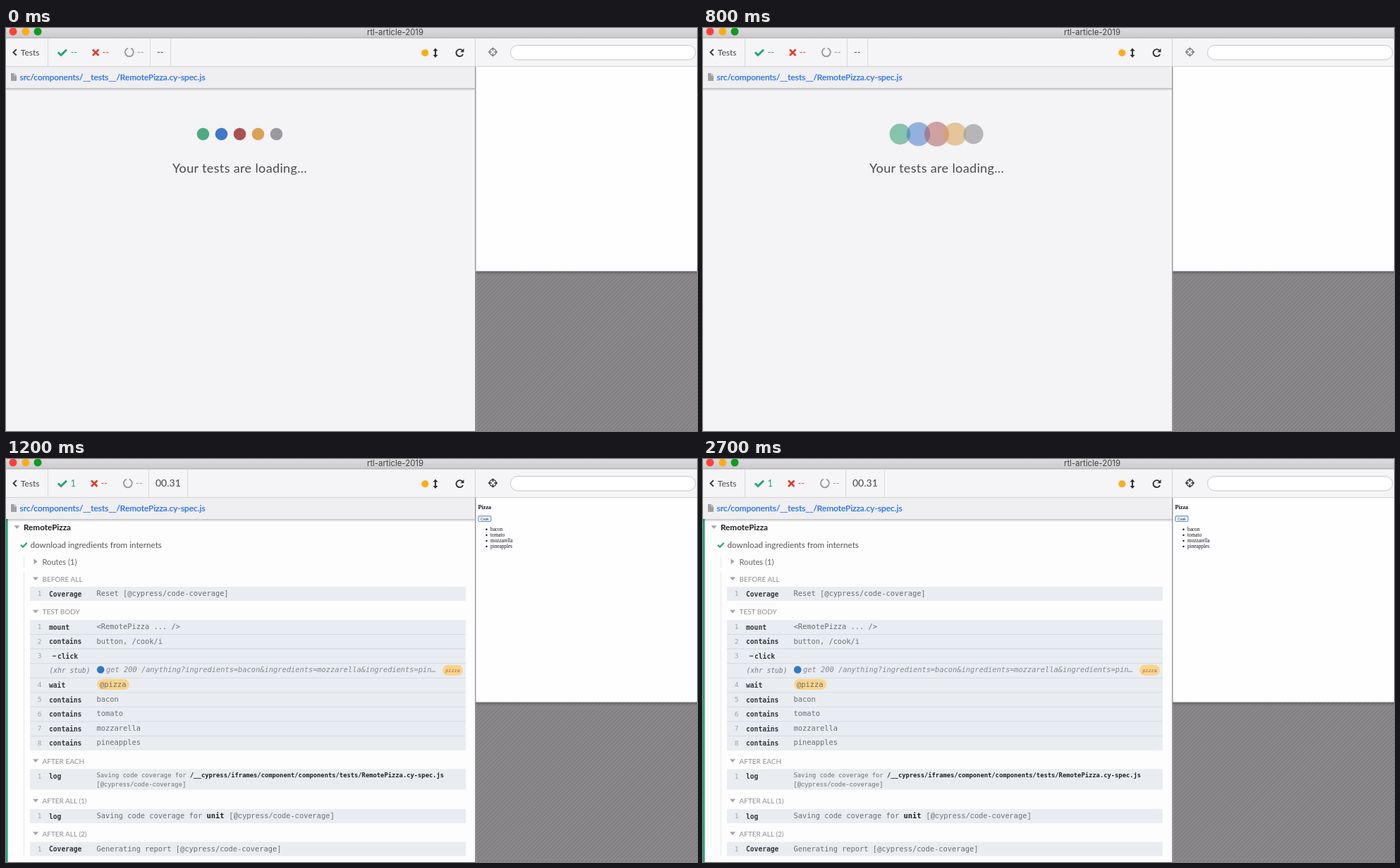
Recreate the animation shown at these times as an HTML page. Size 980 by 571 pixels, loop 2.8 s.

```html
<!DOCTYPE html>
<html lang="en">
<head>
<meta charset="utf-8">
<title>Test runner</title>
<style>
  html, body { margin: 0; width: 100%; height: 100%; overflow: hidden; background: #f4f3f5; }
  svg { display: block; width: 980px; height: 571px; }
  text { font-family: Lato, "Open Sans", sans-serif; white-space: pre; }
  .mono { font: 10.36px "DejaVu Sans Mono", monospace; fill: #6a6d73; }
  .cmd { font-size: 9.65px; font-weight: bold; fill: #33363b; }
  .num { font-size: 9.5px; fill: #9da0a8; text-anchor: end; }
  .it { font-style: italic; fill: #868a92; }
  .stub { font-size: 9.65px; fill: #777b83; }
  .live { font-weight: normal; fill: #3b82d2; }
  .small { font-size: 8.8px; }
  .tag { font-family: "Liberation Mono", monospace; }
  .strong { font-weight: bold; fill: #1d1f22; }
  .alias { font-size: 6.8px; fill: #84724f; text-anchor: middle; }
  .head { font-size: 10px; fill: #8d8c91; }
  .page text { font-family: "Liberation Serif", serif; font-size: 7.25px; fill: #111; }
  .line { fill: none; }
  .guide { fill: none; stroke: #cfced2; stroke-dasharray: 1 1; }
  .stat { font-size: 13px; }
  .time { font-size: 14px; fill: #47474a; }
</style>
</head>
<body>
<svg viewBox="0 0 980 571">
  <defs>
    <linearGradient id="bar" x2="0" y2="1">
      <stop stop-color="#dddbdd"/><stop offset="1" stop-color="#cbc9cb"/>
    </linearGradient>
    <linearGradient id="shade" x2="0" y2="1">
      <stop stop-color="#000" stop-opacity=".24"/><stop offset="1" stop-color="#000" stop-opacity="0"/>
    </linearGradient>
    <pattern id="hatch" width="4" height="4" patternUnits="userSpaceOnUse" patternTransform="rotate(45)">
      <rect width="1.7" height="4" fill="#7e7c7e"/>
    </pattern>
    <path id="fold" d="M-4-2.3H4L0 2.5Z" fill="#a3a2a6"/>
    <g id="reload" fill="none" stroke="#303033" stroke-width="1.9">
      <path d="M3.6-3.4A5 5 0 1 0 4.6 2.2"/><path d="M6-6V-.8H.8Z" fill="#303033" stroke="none"/>
    </g>
  </defs>

  <rect width="980" height="571" fill="#f4f3f5"/>

  <!-- test list -->
  <g data-in="run">
    <rect y="85" width="665" height="233" fill="#fefdfe"/>
    <rect y="317.5" width="665" height="1.5" fill="#c3c2c4"/>
    <rect y="319" width="665" height="2" fill="#e7e6e8"/>
  </g>
  <g data-in="done">
    <rect y="85" width="665" height="486" fill="#fefdfe"/>
    <rect y="85" width="2.6" height="486" fill="#1fa678"/>
  </g>
  <g data-in="run done" id="log">
    <use href="#fold" x="15.5" y="96.5"/>
    <text x="25" y="100.5" font-size="11.7" font-weight="bold" fill="#1c1c1f">RemotePizza</text>
    <text x="34.5" y="125.5" font-size="11.7" fill="#55555a">download ingredients from internets</text>
    <path d="M39.5 141.3V149.3L44.5 145.3Z" fill="#a3a2a6"/>
    <text x="51.5" y="149.7" font-size="11.1" fill="#626267">Routes (1)</text>
    <path d="M25.5 139V154" class="guide"/>
  </g>
  <g data-in="run">
    <g id="sync" fill="none" stroke="#4a4a4e" stroke-width="1.5">
      <path d="M21 120.5A4.3 4.3 0 0 1 28.5 118.8M29.3 122.5A4.3 4.3 0 0 1 21.8 124.2"/>
      <path d="M30.5 116.5V121H26ZM19.8 126.5V122H24.3Z" fill="#4a4a4e" stroke="none"/>
    </g>
    <path d="M25.5 160V309" class="guide"/>
  </g>
  <g data-in="done">
    <path d="M21 121.8L24 124.7L29.7 118.8" class="line" stroke="#1fa678" stroke-width="2.2"/>
    <path d="M25.5 160V562" class="guide"/>
  </g>
  <g data-in="run" id="running"></g>
  <g data-in="done" id="finished"></g>

  <!-- loader -->
  <g data-in="load">
    <g id="dots"></g>
    <text x="331.5" y="205" font-size="18" letter-spacing=".36" text-anchor="middle" fill="#4b4b4f">Your tests are loading...</text>
  </g>

  <!-- file bar -->
  <rect y="85" width="665" height="4" fill="url(#shade)"/>
  <rect y="55" width="665" height="30" fill="#efeef1"/>
  <path d="M7 64H12L15 67V75H7Z" fill="#a09fa3"/>
  <path d="M12 64V67H15" class="line" stroke="#efeef1" stroke-width=".8"/>
  <text x="19.5" y="73.7" font-size="11.95" fill="#2470e6" stroke="#2470e6" stroke-width=".25">src/components/__tests__/RemotePizza.cy-spec.js</text>

  <!-- preview -->
  <rect x="666" y="55" width="314" height="290" fill="#fefdff"/>
  <g class="page" data-in="run done" id="page">
    <text x="669.5" y="70.5" style="font-size:8.2px;font-weight:bold">Pizza</text>
    <rect x="669.9" y="80.9" width="18" height="7.6" rx="1.5" fill="#fff" stroke="#5b8fd6" stroke-width="1.2"/>
    <text x="678.9" y="86.5" text-anchor="middle" style="font-family:'Liberation Sans',sans-serif;font-size:5px">Cook</text>
  </g>
  <rect x="666" y="345" width="314" height="226" fill="#8d8b8d"/>
  <rect x="666" y="345" width="314" height="226" fill="url(#hatch)"/>
  <rect x="666" y="345" width="314" height="5" fill="url(#shade)"/>
  <rect x="666" y="344.5" width="314" height="1.2" fill="#6d6b6d"/>
  <rect x="665" y="55" width="1.5" height="516" fill="#99979a"/>

  <!-- toolbar -->
  <rect y="14" width="980" height="40" fill="#f5f4f6"/>
  <rect y="54" width="980" height="1" fill="#d2d1d4"/>
  <rect x="665" y="15" width="1" height="39" fill="#d2d1d4"/>
  <path d="M14.8 30.3L10.5 34.5L14.8 38.7" class="line" stroke="#3b3b3e" stroke-width="1.9"/>
  <text x="20.8" y="39" font-size="12" fill="#47474a">Tests</text>
  <rect x="59" y="15" width="1" height="39" fill="#d9d8db"/>
  <path d="M73.8 34.5L78 38.5L86 30.7" class="line" stroke="#1fa678" stroke-width="3"/>
  <text x="91.5" y="39" class="stat" fill="#1fa678" id="passed">--</text>
  <g id="shift">
    <path d="M123 30.5L131.5 39M131.5 30.5L123 39" class="line" stroke="#e13a2d" stroke-width="2.6"/>
    <text x="136.5" y="39" class="stat" fill="#e1493c">--</text>
    <path d="M176.8 28.7A6 6 0 1 1 172.9 28.7" class="line" stroke="#99989c" stroke-width="1.9"/>
    <text x="186" y="39" class="stat" fill="#99989c">--</text>
    <rect x="204" y="15" width="1" height="39" fill="#d9d8db"/>
    <text x="214" y="39" class="time" id="time">--</text>
    <rect x="233" y="15" width="1" height="39" fill="#d9d8db" id="edge"/>
  </g>
  <circle cx="594.3" cy="35.2" r="5" fill="#fbad18"/>
  <path d="M609 28.5L612.5 32.5H610V38H612.5L609 42L605.5 38H608V32.5H605.5Z" fill="#303033"/>
  <use href="#reload" x="643.5" y="35" data-in="load done"/>
  <rect x="639" y="30" width="10" height="10" fill="#303033" data-in="run"/>
  <g class="line" id="aim" stroke-width="1.4">
    <circle cx="690.5" cy="34" r="4.7"/>
    <path d="M690.5 27.5V32.2M690.5 35.8V40.5M684 34H688.7M692.3 34H697"/>
  </g>
  <rect x="715.5" y="24.5" width="262.5" height="20.5" rx="10.2" fill="#fff" stroke="#c6c5c8"/>

  <!-- window title -->
  <rect width="980" height="14" fill="url(#bar)"/>
  <rect y="13.5" width="980" height="1" fill="#aaa8aa"/>
  <circle cx="10" cy="5" r="5.5" fill="#fc4238"/>
  <circle cx="27.8" cy="5" r="5.5" fill="#fdab1c"/>
  <circle cx="45" cy="5" r="5.5" fill="#0f9a20"/>
  <text x="552" y="9.8" text-anchor="middle" style="font-family:Inter,sans-serif" font-size="11.4" fill="#414143">rtl-article-2019</text>
</svg>

<script>
const $ = id => document.getElementById(id);
const add = (id, markup) => $(id).insertAdjacentHTML('beforeend', markup);
const esc = s => s.replace(/&/g, '&amp;').replace(/</g, '&lt;');
const mono = (x, y, cls, s) => `<text x="${x}" y="${y}" class="mono ${cls}">${esc(s)}</text>`;
const box = (y, h, fill = '#e9edf1') => `<rect x="34" y="${y}" width="618" height="${h}" fill="${fill}"/>`;
const pill = (x, y, w, h) => `<rect x="${x}" y="${y}" width="${w}" height="${h}" rx="${h / 2}" fill="#fbd48b"/>`;
const head = (y, s) => `<use href="#fold" x="42" y="${y - 0.5}"/><text x="51.5" y="${y + 3.7}" class="head">${s}</text>`;
const row = (y, n, cmd, msg, h = 20) =>
  box(y, h) + mono(50.5, y + 13.2, 'num', n) + mono(61, y + 13.8, 'cmd', cmd) + mono(128.5, y + 13, '', msg);

const TOP = 228, STEP = 20.55;
const rowY = i => TOP + i * STEP;
const bodyRow = (i, n, cmd, msg) => row(rowY(i), n, cmd, msg, STEP);
const rule = i => `<rect x="34" y="${rowY(i) - 0.5}" width="618" height="1" fill="#d3dbe2"/>`;
const click = (cls, color) =>
  `<rect x="66" y="${rowY(2) + 9.5}" width="5" height="1.2" fill="${color}"/>` +
  mono(73, rowY(2) + 13.8, 'cmd ' + cls, 'click');
const foods = ['bacon', 'tomato', 'mozzarella', 'pineapples'];

add('log', head(170, 'BEFORE ALL') + row(181, '1', 'Coverage', 'Reset [@cypress/code-coverage]') +
  head(216.5, 'TEST BODY') +
  bodyRow(0, '1', 'mount', '<RemotePizza ... />') +
  bodyRow(1, '2', 'contains', 'button, /cook/i') +
  box(rowY(3), STEP) + mono(61.5, 303.2, 'it stub', '(xhr stub)') +
  '<circle cx="134.2" cy="298.5" r="5.3" fill="#2f78c4"/>' +
  mono(142, 302.4, 'it', 'get 200 /anything?ingredients=bacon&ingredients=mozzarella&ingredients=pin…') +
  pill(619, 291.8, 29, 15) + mono(633.5, 302, 'it alias', 'pizza') +
  rule(1) + rule(2));

add('running', box(rowY(2), STEP, '#dae9f7') +
  `<rect x="33.4" y="${rowY(2)}" width="2" height="${STEP}" fill="#3c7dc3"/>` +
  '<rect x="47" y="286.4" width="605" height="1.8" fill="#4787cc"/>' +
  '<circle id="wait" cx="47.5" cy="278.5" r="4.5" fill="none" stroke="#5f9bdc" stroke-width="1.4" stroke-dasharray="1.7 1.83"/>' +
  click('live', '#3b82d2'));

add('finished', box(rowY(2), STEP) + mono(50.5, rowY(2) + 13.2, 'num', '3') + click('', '#33363b') +
  bodyRow(4, '4', 'wait', '') + pill(129, 311.7, 46, 15.4) + mono(133, 323.2, '', '@pizza') +
  foods.map((s, i) => bodyRow(i + 5, String(i + 5), 'contains', s)).join('') +
  [2, 3, 4, 5, 6, 7, 8].map(rule).join('') +
  head(428, 'AFTER EACH') + row(439.3, '1', 'log', '', 29.2) +
  mono(128.5, 451.3, 'small', 'Saving code coverage for') +
  mono(261, 451.3, 'small strong', '/__cypress/iframes/component/components/tests/RemotePizza.cy-spec.js') +
  mono(128.5, 464, 'small tag', '[@cypress/code-coverage]') +
  head(484.5, 'AFTER ALL (1)') + row(496, '1', 'log', 'Saving code coverage for') +
  mono(284.5, 509, 'strong', 'unit') +
  mono(316.5, 509, 'tag', '[@cypress/code-coverage]') +
  head(531, 'AFTER ALL (2)') + row(542.5, '1', 'Coverage', 'Generating report [@cypress/code-coverage]'));

foods.forEach((s, i) => {
  const y = 99.8 + i * 8.05;
  add('page', `<circle cx="681.5" cy="${y}" r="1.2" fill="#111"/><text x="687" y="${y + 2.2}">${s}</text>`);
});

['#4cab83', '#4078c8', '#ac504f', '#d9a354', '#9a9b9f'].forEach((c, i) =>
  add('dots', `<circle cx="${279.5 + i * 26}" cy="150.3" fill="${c}"/>`));

const LOOP = 2800, TICK = 100, START = 1000, END = 1200;
const dots = [...$('dots').children];
const parts = [...document.querySelectorAll('[data-in]')];

// Each dot swells to double size and half opacity, one after another.
function pulse(t) {
  dots.forEach((dot, i) => {
    const p = Math.max(0, Math.min(1, (t - 115 - i * 100) / 1000));
    const e = (1 - Math.cos(2 * Math.PI * p)) / 2;
    dot.setAttribute('r', 8.75 * (1 + e));
    dot.setAttribute('opacity', 1 - e / 2);
  });
}

function draw(t) {
  const state = t < START ? 'load' : t < END ? 'run' : 'done';
  const done = state === 'done';
  for (const el of parts) el.style.display = el.dataset.in.includes(state) ? '' : 'none';
  pulse(t);
  $('passed').textContent = done ? '1' : '--';
  $('shift').setAttribute('transform', `translate(${done ? -2 : 0})`);
  $('time').textContent = { load: '--', run: t < 1100 ? '00.12' : '00.21', done: '00.31' }[state];
  $('time').style.fontSize = state === 'load' ? '13px' : '';
  $('edge').setAttribute('x', state === 'load' ? 233 : 259);
  $('aim').setAttribute('stroke', { load: '#77767a', run: '#555558', done: '#2a2a2d' }[state]);
  const turn = (t - START) * 0.36;
  $('sync').setAttribute('transform', `rotate(${turn} 25.2 121.5)`);
  $('wait').setAttribute('transform', `rotate(${turn} 47.5 278.5)`);
}

function loop() {
  draw(Math.floor(performance.now() % LOOP / TICK) * TICK);
  requestAnimationFrame(loop);
}
loop();
</script>
</body>
</html>
```
